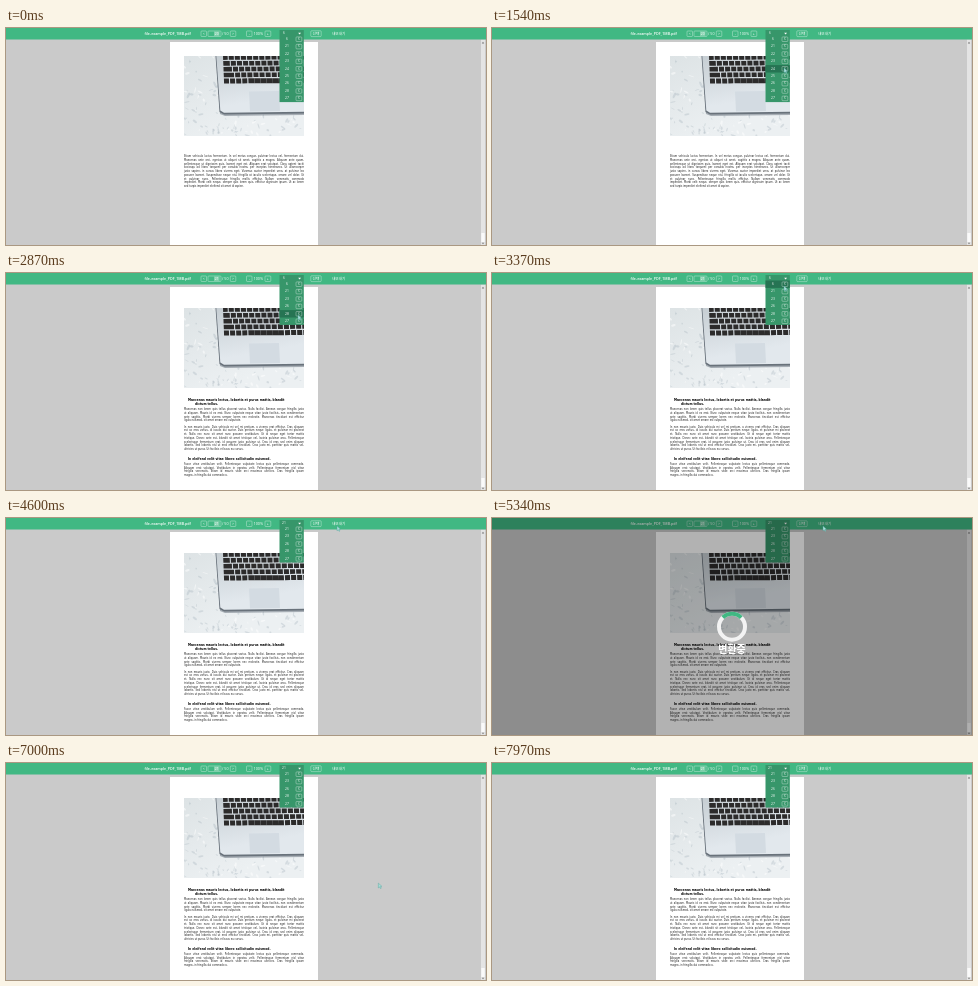
These frames come from a looping animation (480 by 217 pixels, 8 s). An HTML page with a canvas:

```html
<!DOCTYPE html>
<html lang="ko">
<head>
<meta charset="utf-8">
<title>PDF page picker</title>
<style>
html, body { margin: 0; width: 100%; height: 100%; overflow: hidden; background: #cacaca; }
canvas { display: block; width: 480px; height: 217px; }
</style>
</head>
<body>
<canvas id="stage"></canvas>
<script>
const W = 480, H = 217, LOOP = 8000;
const GREEN = '#41b883', DARK_GREEN = '#37966a', HOVER_GREEN = '#267453';
const UI_FONT = '"Open Sans", "Noto Sans CJK KR", "Noto Sans CJK", sans-serif';
const PAGE_FONT = '"DejaVu Sans", sans-serif';
const canvas = document.getElementById('stage');
const dpr = Math.max(1, window.devicePixelRatio || 1);
canvas.width = W * dpr;
canvas.height = H * dpr;
const stageCtx = canvas.getContext('2d');
let ctx = stageCtx;

// Timeline
const SPINS = [
  { from: 1670, stop: 2080, to: 2140 },
  { from: 2300, stop: 2700, to: 2840 }
];
const EXPORT = { from: 5340, to: 5960 };
const SECOND_PAGE = 2840;
const ROWS = [6, 21, 22, 23, 24, 25, 26, 28, 27];
const REMOVALS = [[2140, 24], [2300, 25], [2840, 22], [4070, 6]];
const CURSOR_PATH = [
  [300, 484, 190], [1100, 292, 80], [1140, 292, 76], [1200, 292, 40],
  [2200, 292, 40], [2300, 292, 42], [3200, 292, 42], [3360, 292, 13],
  [4070, 292, 13], [4600, 331, 8], [5900, 331, 8], [6060, 332, 58],
  [6170, 332, 58], [6970, 372, 120], [7770, 452, 150], [7960, 484, 160]
];

const PAGE_ONE = [
  { x: 178, y: 128.4, lines: `Etiam vehicula luctus fermentum. In vel metus congue, pulvinar lectus vel, fermentum dui.
Maecenas ante orci, egestas ut aliquet sit amet, sagittis a magna. Aliquam ante quam,
pellentesque ut dignissim quis, laoreet eget est. Aliquam erat volutpat. Class aptent taciti
sociosqu ad litora torquent per conubia nostra, per inceptos himenaeos. Ut ullamcorper
justo sapien, in cursus libero viverra eget. Vivamus auctor imperdiet urna, at pulvinar leo
posuere laoreet. Suspendisse neque nisl, fringilla at iaculis scelerisque, ornare vel dolor. Ut
et pulvinar nunc. Pellentesque fringilla mollis efficitur. Nullam venenatis commodo
imperdiet. Morbi velit neque, semper quis lorem quis, efficitur dignissim ipsum. Ut ac lorem
sed turpis imperdiet eleifend sit amet id sapien.` }
];
const PAGE_TWO = [
  { x: 182, y: 127, heading: true, lines: 'Maecenas mauris lectus, lobortis et purus mattis, blandit' },
  { x: 189, y: 131.5, heading: true, lines: 'dictum tellus.' },
  { x: 178, y: 136.6, lines: `Maecenas non lorem quis tellus placerat varius. Nulla facilisi. Aenean congue fringilla justo
ut aliquam. Mauris id ex erat. Nunc vulputate neque vitae justo facilisis, non condimentum
ante sagittis. Morbi viverra semper lorem nec molestie. Maecenas tincidunt est efficitur
ligula euismod, sit amet ornare est vulputate.` },
  { x: 178, y: 154, lines: `In non mauris justo. Duis vehicula mi vel mi pretium, a viverra erat efficitur. Cras aliquam
est ac eros varius, id iaculis dui auctor. Duis pretium neque ligula, et pulvinar mi placerat
et. Nulla nec nunc sit amet nunc posuere vestibulum. Ut id neque eget tortor mattis
tristique. Donec ante est, blandit sit amet tristique vel, lacinia pulvinar arcu. Pellentesque
scelerisque fermentum erat, id posuere justo pulvinar ut. Cras id eros sed enim aliquam
lobortis. Sed lobortis nisl ut eros efficitur tincidunt. Cras justo mi, porttitor quis mattis vel,
ultricies ut purus. Ut facilisis et lacus eu cursus.` },
  { x: 182, y: 185.8, heading: true, lines: 'In eleifend velit vitae libero sollicitudin euismod.' },
  { x: 178, y: 191.2, lines: `Fusce vitae vestibulum velit. Pellentesque vulputate lectus quis pellentesque commodo.
Aliquam erat volutpat. Vestibulum in egestas velit. Pellentesque fermentum nisl vitae
fringilla venenatis. Etiam id mauris vitae orci maximus ultricies. Cras fringilla ipsum
magna, in fringilla dui commodo a.` }
];

function rect(x, y, w, h, color) {
  ctx.fillStyle = color;
  ctx.fillRect(x, y, w, h);
}

function poly(points, fill) {
  ctx.beginPath();
  points.forEach(([x, y]) => ctx.lineTo(x, y));
  ctx.closePath();
  ctx.fillStyle = fill;
  ctx.fill();
}

// Small type is set ten times larger and scaled down to keep its natural spacing.
function text(str, x, y, size, { color = '#fff', align = 'center', weight = 400, justify = 0, font = UI_FONT } = {}) {
  ctx.save();
  ctx.translate(x, y);
  ctx.scale(0.1, 0.1);
  ctx.font = `${weight} ${size * 10}px ${font}`;
  ctx.fillStyle = color;
  ctx.textAlign = align;
  ctx.textBaseline = 'middle';
  if (justify) {
    const words = str.split(' ');
    const widths = words.map(word => ctx.measureText(word).width);
    const gap = (justify * 10 - widths.reduce((a, b) => a + b)) / (words.length - 1);
    let left = 0;
    words.forEach((word, i) => {
      ctx.fillText(word, left, 0);
      left += widths[i] + gap;
    });
  } else {
    ctx.fillText(str, 0, 0);
  }
  ctx.restore();
}

function box(label, x, y, w, h, size = 3.6) {
  ctx.beginPath();
  ctx.roundRect(x, y, w, h, 0.8);
  ctx.strokeStyle = 'rgba(255,255,255,.65)';
  ctx.lineWidth = 0.5;
  ctx.stroke();
  text(label, x + w / 2, y + h / 2, size);
}

function seededRandom(seed) {
  return () => (seed = (seed * 16807) % 2147483647) / 2147483647;
}

function drawMarble() {
  const random = seededRandom(77);
  const stone = ctx.createLinearGradient(0, 0, 40, 80);
  stone.addColorStop(0, '#dde3e5');
  stone.addColorStop(1, '#ecf0f2');
  rect(0, 0, 120, 80, stone);
  for (let i = 0; i < 190; i++) {
    ctx.beginPath();
    ctx.ellipse(random() * 120, random() * 80, 0.7 + random() * 2.4, 0.3 + random() * 0.9,
      random() * 3, 0, Math.PI * 2);
    ctx.fillStyle = i % 3 ? 'rgba(140,155,168,.24)' : 'rgba(255,255,255,.5)';
    ctx.fill();
  }
}

function drawLaptop() {
  poly([[32, 0], [120, 0], [120, 59], [41, 60], [36, 58]], 'rgba(80,92,104,.45)');
  poly([[31.5, 0], [120, 0], [120, 57.5], [40, 58.5], [35.5, 56]], '#69727b');
  const metal = ctx.createLinearGradient(0, 0, 10, 56);
  metal.addColorStop(0, '#c3cbd0');
  metal.addColorStop(1, '#e2e8ed');
  poly([[32.3, 0], [120, 0], [120, 55.8], [40, 56.8], [36.3, 54.5]], metal);
  poly([[65, 35.5], [95, 35], [96, 55], [66, 55.5]], '#d3dbe2');

  ctx.save();
  ctx.transform(1, -0.006, 0.04, 1, 38.5, 0);
  const key = '#2c2b2b', pitch = 5.8;
  for (let row = 0; row < 4; row++) {
    const y = row * pitch - 0.7;
    const first = 4.6 + row * 1.9;
    rect(0.5, y, first, 4.6, key);
    for (let x = first + 1.6; x < 84; x += 6.1) rect(x, y, 5, 4.6, key);
  }
  const bottom = 4 * pitch - 0.7;
  for (let x = 0.5; x < 84; x += 6.1) {
    const underSpace = x > 24 && x < 54;
    rect(x, bottom, underSpace ? 6.1 : 5, 5, key);
  }
  ctx.restore();
}

function drawPhoto(y) {
  ctx.save();
  ctx.translate(178, y);
  ctx.beginPath();
  ctx.rect(0, 0, 120, 80);
  ctx.clip();
  drawMarble();
  drawLaptop();
  ctx.restore();
}

function drawPage(blocks, photoY) {
  rect(164, 14, 148, H, '#fff');
  drawPhoto(photoY);
  for (const { x, y, heading, lines } of blocks) {
    lines.split('\n').forEach((line, i, all) => {
      const full = !heading && i < all.length - 1;
      text(line, x, y + i * 3.75, heading ? 2.98 : 2.49, {
        color: heading ? '#000' : '#222', align: 'left', font: PAGE_FONT,
        weight: heading ? 700 : 400, justify: full ? 120 : 0
      });
    });
  }
}

function cachePage(...args) {
  const layer = document.createElement('canvas');
  layer.width = canvas.width;
  layer.height = canvas.height;
  ctx = layer.getContext('2d');
  ctx.scale(dpr, dpr);
  drawPage(...args);
  ctx = stageCtx;
  return layer;
}

const pages = [cachePage(PAGE_ONE, 28), cachePage(PAGE_TWO, 35)];

function drawSpinner(x, y, elapsed) {
  const turn = elapsed / 2000 * Math.PI * 2;
  ctx.lineWidth = 4;
  ctx.strokeStyle = '#f3f3f3';
  ctx.beginPath();
  ctx.arc(x, y, 13, 0, Math.PI * 2);
  ctx.stroke();
  ctx.strokeStyle = GREEN;
  ctx.beginPath();
  ctx.arc(x, y, 13, turn - Math.PI * 0.75, turn - Math.PI * 0.25);
  ctx.stroke();
}

function drawScrollbar() {
  rect(475, 11.5, 4, H, '#e4e4e4');
  rect(475.3, 205, 3.4, 9, '#fafafa');
  poly([[475.8, 15.5], [477, 13.8], [478.2, 15.5]], '#777');
  poly([[475.8, 214.7], [477, 216.2], [478.2, 214.7]], '#777');
}

function drawHeader(pageNumber) {
  rect(0, 0, W, 11.5, GREEN);
  text('file-example_PDF_1MB.pdf', 138.5, 5.6, 3.65, { align: 'left', weight: 600 });
  box('<', 195, 3, 5.5, 5.5);
  box('', 202, 3, 13, 5.5);
  rect(208, 3.6, 5.5, 4.3, 'rgba(255,255,255,.35)');
  text(pageNumber, 210.8, 5.8, 3.4);
  text('/ 50', 219.3, 5.7, 3.7);
  box('>', 224.3, 3, 5.5, 5.5);
  box('-', 240.5, 3, 5.5, 5.5);
  text('100%', 252.3, 5.7, 3.8);
  box('+', 259, 3, 5.8, 5.5);
  box('선택', 304.8, 2.8, 10.4, 5.8, 3.8);
  text('내보내기', 332.7, 5.6, 3.7);
}

function drawDropdown(t, cursor) {
  const removed = REMOVALS.filter(([time]) => t >= time).map(([, value]) => value);
  const rows = ROWS.filter(value => !removed.includes(value));
  const pitch = 7.4, top = 7.5;
  rect(273.5, 2, 24.3, top - 2 + rows.length * pitch, DARK_GREEN);
  text(rows[0], 278, 5.5, 3.4);
  poly([[292.2, 4.8], [295, 4.8], [293.6, 6.5]], '#fff');
  rows.forEach((value, i) => {
    const y = top + i * pitch;
    const hovered = cursor[0] > 273 && cursor[0] < 298 && cursor[1] >= y && cursor[1] < y + pitch;
    if (hovered) rect(273.5, y, 24.3, pitch, HOVER_GREEN);
    text(value, 281, y + 3.7, 3.4);
    box('X', 290, y + 1.4, 5.8, 4.6, 2.8);
  });
}

function cursorAt(t) {
  const next = CURSOR_PATH.findIndex(([time]) => time > t);
  if (next < 1) return [W + 4, 190];
  const [t0, x0, y0] = CURSOR_PATH[next - 1];
  const [t1, x1, y1] = CURSOR_PATH[next];
  const p = (t - t0) / (t1 - t0);
  const ease = p * p * (3 - 2 * p);
  return [x0 + (x1 - x0) * ease, y0 + (y1 - y0) * ease];
}

function drawCursor([x, y]) {
  ctx.save();
  ctx.translate(x, y);
  poly([[0, 0], [0, 4.8], [1.2, 3.8], [2.1, 5.4], [2.9, 5], [2.1, 3.4], [3.5, 3.2]], '#a9dcd8');
  ctx.strokeStyle = '#4aa398';
  ctx.lineWidth = 0.4;
  ctx.stroke();
  ctx.restore();
}

function draw(t) {
  const cursor = cursorAt(t);
  const second = t >= SECOND_PAGE;
  const spin = SPINS.find(({ from, to }) => t >= from && t < to);
  const exporting = t >= EXPORT.from && t < EXPORT.to;
  ctx.setTransform(dpr, 0, 0, dpr, 0, 0);
  rect(0, 0, W, H, '#cacaca');
  if (spin) drawSpinner(237.5, 119.5, Math.min(t, spin.stop) - spin.from);
  else ctx.drawImage(pages[+second], 0, 0, W, H);
  drawScrollbar();
  drawHeader(second ? 21 : 20);
  drawDropdown(t, cursor);
  if (exporting) {
    rect(0, 0, W, H, 'rgba(0,0,0,.3)');
    drawSpinner(240, 108.7, t - EXPORT.from);
    text('변환중', 240, 132.3, 10, { weight: 700 });
  }
  drawCursor(cursor);
}

function frame() {
  draw(performance.now() % LOOP);
  requestAnimationFrame(frame);
}
frame();
</script>
</body>
</html>
```
